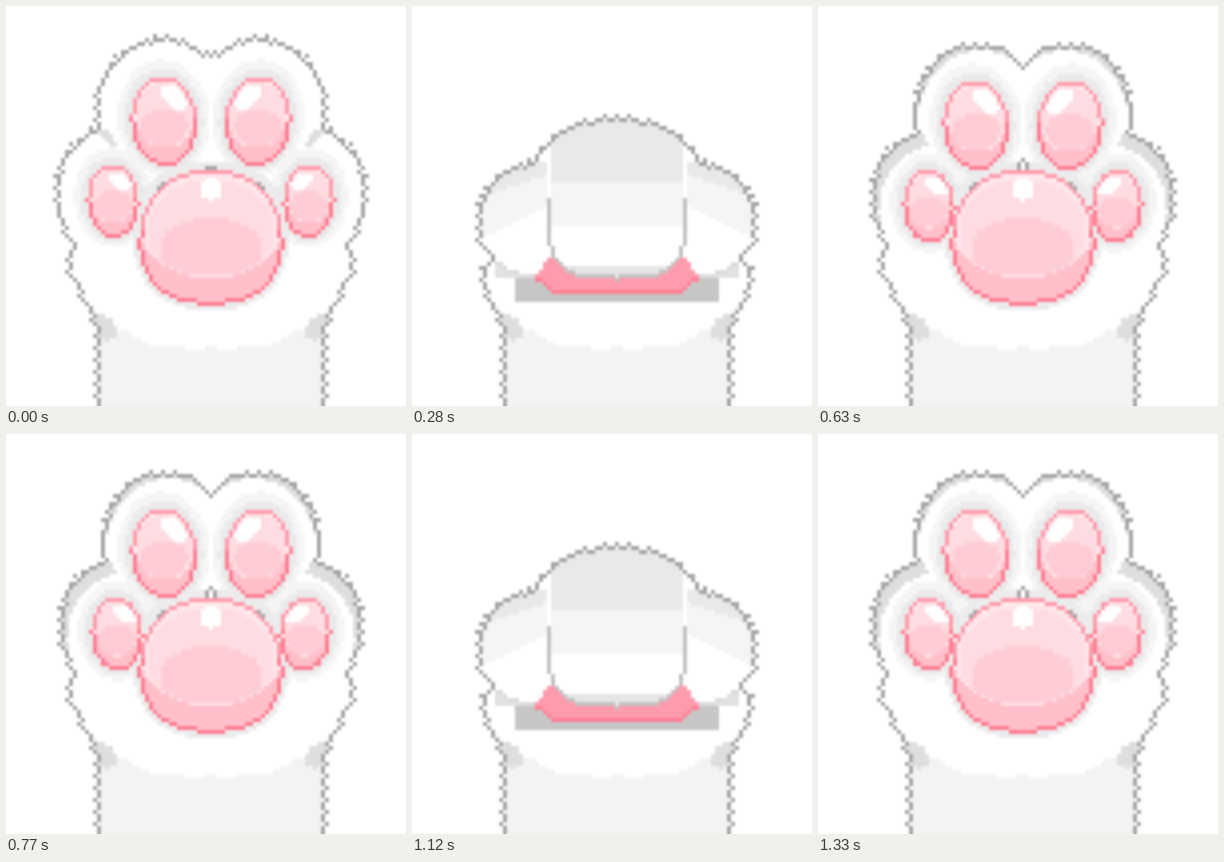
An HTML page with a canvas for the animation above (1400 ms loop, 400x400 px).

```html
<!DOCTYPE html>
<html lang="en">
<head>
<meta charset="utf-8">
<title>Cat paw</title>
<style>
  html, body { margin: 0; width: 100%; height: 100%; overflow: hidden; background: #fff; }
  canvas { display: block; }
</style>
</head>
<body>
<canvas id="stage" width="400" height="400"></canvas>
<script>
const SIZE = 400, CELL = 4, AXIS = 205, STEP = 70;
const FUR_EDGE = '#a6a6a6';

// Shapes are tests (x, y) => boolean for the left half; the right half mirrors it.
const both = (a, b) => (x, y) => a(x, y) && b(x, y);
const minus = (a, b) => (x, y) => a(x, y) && !b(x, y);
const either = (...shapes) => (x, y) => shapes.some(shape => shape(x, y));
const shift = (shape, dx, dy) => (x, y) => shape(x - dx, y - dy);
const above = limit => (x, y) => y < limit;
const below = limit => (x, y) => y > limit;
const box = (left, top, bottom) => (x, y) => x > left && y > top && y < bottom;
const fold = x => x > AXIS ? 2 * AXIS - x : x;
const mix = (a, b, t) => Array.isArray(a) ? a.map((v, i) => mix(v, b[i], t)) : a + (b - a) * t;

// power > 2 squares the oval, skew widens its lower part.
function oval([cx, cy, rx, ry, turn = 0, power = 2, skew = 0]) {
  const c = Math.cos(turn), s = Math.sin(turn);
  return (x, y) => {
    const dx = x - cx, dy = y - cy;
    const v = (dy * c - dx * s) / ry, u = (dx * c + dy * s) / rx / (1 + skew * v);
    return Math.abs(u) ** power + Math.abs(v) ** power <= 1;
  };
}

function poly(p) {
  return (x, y) => {
    let inside = false;
    for (let i = 0, j = p.length - 2; i < p.length; j = i, i += 2) {
      if (p[i + 1] > y !== p[j + 1] > y &&
          x < (p[j] - p[i]) * (y - p[i + 1]) / (p[j + 1] - p[i + 1]) + p[i]) inside = !inside;
    }
    return inside;
  };
}

function rim(shape) {
  return (x, y) => shape(x, y) && !(
    shape(fold(x - CELL), y) && shape(fold(x + CELL), y) &&
    shape(x, y - CELL) && shape(x, y + CELL));
}

// Every third cell along the outline sticks out as a tuft.
function furry(shape) {
  return (x, y) => {
    const col = Math.round((AXIS - x) / CELL), row = Math.floor(y / CELL);
    if ((col + row) % 3) return shape(x, y);
    const dx = AXIS - x, dy = Math.max(0, 220 - y), len = Math.hypot(dx, dy) || 1;
    return shape(x + dx / len * CELL, y + dy / len * CELL);
  };
}

function easel() {
  const canvas = document.createElement('canvas');
  canvas.width = canvas.height = SIZE;
  const g = canvas.getContext('2d');
  g.fillStyle = '#fff';
  g.fillRect(0, 0, SIZE, SIZE);
  function fill(shape, color) {
    g.fillStyle = color;
    for (let x = 1; x <= AXIS; x += CELL) {
      for (let y = 2; y < SIZE; y += CELL) {
        if (!shape(x, y)) continue;
        g.fillRect(x - 2, y - 2, CELL, CELL);
        g.fillRect(2 * AXIS - x - 2, y - 2, CELL, CELL);
      }
    }
  }
  return { canvas, fill };
}

function outline({ lobe, outer, heel }) {
  const palm = poly([...heel, 95, 328, 220, 328, 220, 235]);
  return furry(either(oval(lobe), oval(outer), palm, (x, y) => x > 92 && y > 320));
}

function drawWrist(art, body) {
  const hem = x => 342 - 24 * ((AXIS - x) / 100) ** 3 + 2 * Math.sin(x / 7);
  art.fill(both(body, (x, y) => y > hem(x)), '#f3f3f3');
  art.fill(both(body, oval([97, 321, 16, 11, .7])), '#dedede');
}

function drawPad(art, pad, shine, shineColor) {
  const [cx, cy, rx, ry, turn, ...form] = pad;
  const shape = oval(pad);
  const layer = (sx, sy, dy) => both(shape, oval([cx, cy + dy * ry, rx * sx, ry * sy, turn, ...form]));
  art.fill(shape, '#ffc0ca');
  art.fill(layer(1, 1, -.4), '#ffe6ea');
  art.fill(layer(.87, .72, -.12), '#ffdce1');
  art.fill(layer(.72, .42, .15), '#ffccd4');
  art.fill(both(shape, oval(shine)), shineColor);
  art.fill(rim(shape), '#ff7f93');
  art.fill(both(rim(shape), above(cy - ry * .1)), '#ff9dac');
}

function drawToe(art, pad, shineColor) {
  const [cx, cy, rx, ry, turn] = pad;
  drawPad(art, pad, [cx + rx * .3, cy - ry * .52, rx * .46, ry * .2, turn + .7], shineColor);
}

function drawOpen(pose) {
  const art = easel(), body = outline(pose);
  const lobe = oval(pose.lobe), outer = oval(pose.outer);
  const [px, py, prx, pry] = pose.palm, toes = [pose.toe, pose.side];
  const crescent = (shape, size) => minus(shape, shift(shape, size * .5, size));
  art.fill(body, '#fff');
  drawWrist(art, body);
  art.fill(both(body, minus(crescent(outer, pose.shade), lobe)), pose.shadeColor);
  art.fill(both(body, crescent(lobe, pose.shade / 2)), pose.shadeColor);
  art.fill(both(body, oval(pose.cleft)), '#dedede');
  for (const [grow, color] of [[13, '#f5f5f5'], [6, '#eaeaea']]) {
    for (const [cx, cy, rx, ry, turn] of toes) {
      const size = grow * pose.halo;
      art.fill(both(body, oval([cx, cy - size / 4, rx + size, ry + size, turn])), color);
    }
  }
  art.fill(both(body, oval(pose.hollow)), pose.hollowColor);
  art.fill(both(body, (x, y) => x === AXIS && y < pose.seam), '#cdcdcd');
  art.fill(rim(body), FUR_EDGE);
  drawPad(art, pose.palm, [px, py - pry * .7, prx * .16, pry * .16], pose.shineColor);
  for (const toe of toes) drawToe(art, toe, pose.shineColor);
  return art.canvas;
}

function drawFist(drop) {
  const art = easel();
  const lobe = [205, 190 + drop, 94, 78], outer = [125, 215 + drop, 60, 58];
  const body = outline({ lobe, outer, heel: [82, 248, 70, 264, 74, 290] });
  const fill = (shape, color) => art.fill(both(body, shape), color);
  const toe = oval(outer), finger = oval([205, 200 + drop, 71, 74, 0, 3.3]);
  const slope = (top, pitch) => (x, y) => y < top + drop + (136 - x) * pitch;
  fill(() => true, '#fff');
  drawWrist(art, body);
  if (drop) fill(oval([205, 300, 104, 32, 0, 3]), '#e9e9e9');
  fill(box(84, 252 + drop, 274 + drop), '#e2e2e2');
  fill(box(102, 270 + drop, 296 + drop), '#c6c6c6');
  fill(toe, '#fff');
  fill(both(rim(toe), below(244 + drop)), '#dcdcdc');
  fill(both(toe, slope(200, .5)), '#f5f5f5');
  fill(both(toe, slope(168, .35)), '#e9e9e9');
  if (!drop) {
    const pink = poly([136, 254, 122, 272, 146, 290, 264, 290, 264, 254]);
    fill(pink, '#ff9bac');
    fill(both(rim(pink), below(270)), '#ff8296');
  }
  fill(finger, '#fff');
  fill(both(finger, below(260 + drop)), '#e6e6e6');
  fill(both(rim(finger), below(190 + drop)), '#c2c2c2');
  fill(both(finger, both(above(220 + drop), box(138, 0, SIZE))), '#f5f5f5');
  fill(box(137, 0, 178 + drop), '#e9e9e9');
  art.fill(rim(body), FUR_EDGE);
  return art.canvas;
}

// Ovals are [cx, cy, rx, ry, turn, power, skew].
const spread = {
  lobe: [158, 108, 69, 75], outer: [105, 188, 54, 67], heel: [72, 236, 60, 252, 67, 274],
  cleft: [101, 131, 14, 4, .8], seam: 0,
  shade: 0, shadeColor: '#dedede', halo: 1,
  hollow: [205, 230, 78, 75, 0, 2.3], hollowColor: '#ececec',
  palm: [205, 231, 72, 68, 0, 2.2, .06],
  toe: [158, 115, 33, 45, -.08], side: [107, 195, 26, 37, -.06],
  shineColor: '#fff'
};

const relaxed = {
  ...spread,
  lobe: [160, 110, 64, 72], outer: [107, 192, 53, 64],
  shade: 14,
  toe: [158, 119, 33, 45, -.08], side: [111, 200, 26, 37, -.06]
};

const curled = {
  lobe: [185, 160, 78, 70], outer: [120, 198, 54, 55], heel: [90, 236, 74, 256, 76, 280],
  cleft: [121, 154, 14, 3, .9], seam: 150,
  shade: 20, shadeColor: '#f3f3f3', halo: 0,
  hollow: [205, 235, 106, 75, 0, 3], hollowColor: '#cacaca',
  palm: [205, 247, 71, 52, 0, 2.6, .13],
  toe: [172, 177, 30, 20, -.3], side: [129, 218, 15, 28, .42],
  shineColor: '#fff0f2'
};

const folding = { ...curled, hollowColor: '#dadada' };
for (const key in folding) {
  if (typeof folding[key] !== 'string') folding[key] = mix(relaxed[key], curled[key], .5);
}

const poses = [...[spread, relaxed, folding, curled].map(drawOpen), drawFist(0), drawFist(14)];
const ctx = document.getElementById('stage').getContext('2d');

// The paw closes pose by pose, then opens again the same way.
function frame(now) {
  const beat = Math.floor(now / STEP) % 10;
  const pose = poses[Math.min(beat, 10 - beat)];
  ctx.filter = 'none';
  ctx.drawImage(pose, 0, 0);
  ctx.filter = 'blur(1px)';
  ctx.drawImage(pose, 0, 0);
  requestAnimationFrame(frame);
}
requestAnimationFrame(frame);
</script>
</body>
</html>
```
